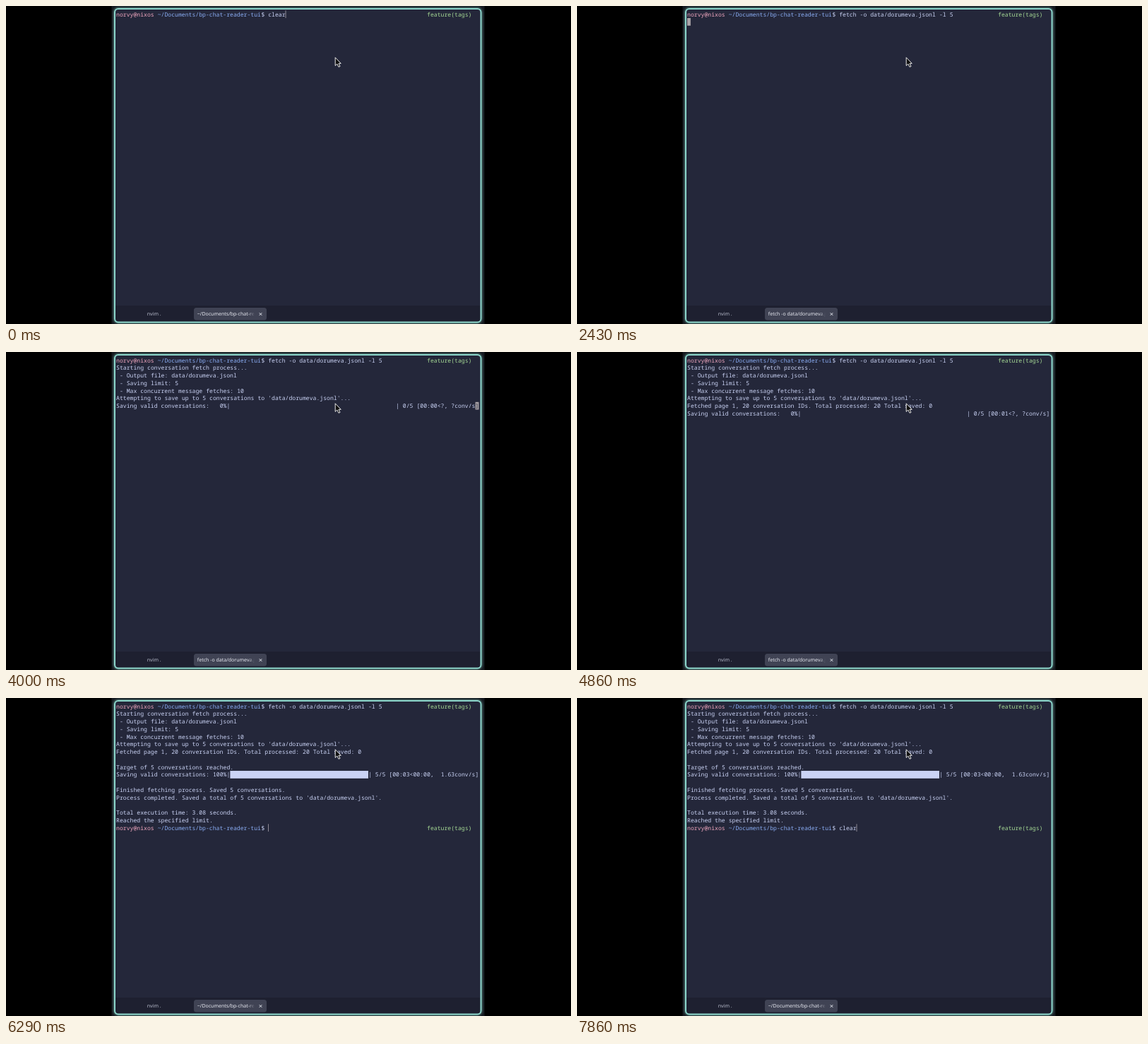
These frames come from a looping animation (800 px wide and 450 px high, 8 s). An HTML page:

```html
<!DOCTYPE html>
<html lang="en">
<head>
<meta charset="utf-8">
<title>Terminal fetch</title>
<style>
  html, body { margin: 0; width: 100%; height: 100%; overflow: hidden; background: #000; }
  svg { display: block; width: 800px; height: 450px; }
  text { white-space: pre; text-rendering: geometricPrecision; }
  #screen { font: 500 8.15px "Noto Sans Mono", "DejaVu Sans Mono", monospace; fill: #cad3f5; }
  .tab { font: 400 7px "Noto Sans", "Open Sans", sans-serif; }
</style>
</head>
<body>
<svg viewBox="0 0 800 450">
  <defs>
    <filter id="blur" x="-5%" y="-5%" width="110%" height="110%">
      <feGaussianBlur stdDeviation="1.5"/>
    </filter>
    <linearGradient id="fade" gradientUnits="userSpaceOnUse" x1="343" y1="0" x2="352" y2="0">
      <stop stop-color="#e6e8f0"/>
      <stop offset="1" stop-color="#e6e8f0" stop-opacity="0"/>
    </linearGradient>
    <clipPath id="frame"><rect x="154" y="4" width="518.5" height="443.5" rx="5"/></clipPath>
  </defs>
  <rect width="800" height="450"/>
  <rect x="149.5" y="0" width="528" height="450" fill="#15181e"/>
  <rect x="154" y="4" width="518.5" height="443.5" rx="5" fill="none" stroke="#8bd5ca" stroke-width="4" opacity=".5" filter="url(#blur)"/>
  <g clip-path="url(#frame)">
    <rect x="154" y="4" width="519" height="444" fill="#24273a"/>
    <rect x="154" y="424" width="519" height="24" fill="#1e2030"/>
  </g>
  <rect x="154" y="4" width="518.5" height="443.5" rx="5" fill="none" stroke="#8bd5ca" stroke-width="2"/>

  <text class="tab" x="199.8" y="438.3" fill="#b4b8c8">nvim .</text>
  <rect x="266" y="427" width="103" height="17.5" rx="3.5" fill="#404354"/>
  <text class="tab" id="title" x="270.8" y="438.3" fill="url(#fade)"></text>
  <path d="M358.7 434.2l3.6 3.6m0-3.6l-3.6 3.6" stroke="#e6e8f0" stroke-width="1"/>

  <g id="screen"></g>
  <path d="M466.2 72.8V84.4L468.9 82L471 86.3L473 85.4L471 81.3H474.3Z" fill="#111" stroke="#fff" stroke-width=".9" stroke-linejoin="round"/>
</svg>
<script>
const LOOP = 8000, COLS = 105, CELL = 4.89, ROW = 10.75, LEFT = 156, TOP = 6.3;
const NS = "http://www.w3.org/2000/svg";
const screenEl = document.getElementById("screen");
const titleEl = document.getElementById("title");

const FILE = "data/dorumeva.jsonl";
const COMMAND = `fetch -o ${FILE} -l 5`;
const FOLDER = "~/Documents/bp-chat-reader-tui";
const INTRO = [
  "Starting conversation fetch process...",
  ` - Output file: ${FILE}`,
  " - Saving limit: 5",
  " - Max concurrent message fetches: 10",
  `Attempting to save up to 5 conversations to '${FILE}'...`
];
const PAGE = "Fetched page 1, 20 conversation IDs. Total processed: 20 Total saved: 0";
const REACHED = ["", "Target of 5 conversations reached."];
const SUMMARY = [
  "",
  "Finished fetching process. Saved 5 conversations.",
  `Process completed. Saved a total of 5 conversations to '${FILE}'.`,
  "",
  "Total execution time: 3.08 seconds.",
  "Reached the specified limit."
];

const prompt = input => ({ input });
const progress = (done, stats) => ({ done, stats });
const start = [prompt(COMMAND), ...INTRO];
const saved = [...start, PAGE, ...REACHED];
const finished = [...saved, progress(5, "00:03<00:00,  1.63conv/s"), ...SUMMARY];

// [time, lines, command running]
const steps = [
  [0, [prompt("clear")]],
  [140, [prompt("")]],
  [1290, [prompt("clear")]],
  [1430, [prompt(COMMAND)]],
  [1860, [prompt(COMMAND), ""], true],
  [2860, [...start, progress(0, "00:00<?, ?conv/s")], true],
  [4430, [...start, PAGE, progress(0, "00:01<?, ?conv/s")], true],
  [5000, [...saved, progress(5, "00:02<00:00,  2.06s/conv")], true],
  [6140, [...finished, prompt("")]],
  [7710, [...finished, prompt(COMMAND)]],
  [7860, [...finished, prompt("clear")]]
];
// times when the block cursor shows while a command runs
const blockTimes = [[1860, 3140], [3740, 4340], [4940, 5540]];

function add(tag, attrs, parent = screenEl) {
  const el = document.createElementNS(NS, tag);
  for (const key in attrs) el.setAttribute(key, attrs[key]);
  return parent.appendChild(el);
}

const colX = col => LEFT + col * CELL;
const rowY = row => TOP + row * ROW;

function write(row, col, str, fill = "#cad3f5") {
  const text = add("text", { y: rowY(row) + 8.2, fill });
  for (const word of str.matchAll(/\S+\s*/g)) {
    add("tspan", { x: colX(col + word.index) }, text).textContent = word[0];
  }
  return col + str.length;
}

function cells(row, col, count, fill) {
  add("rect", { x: colX(col), y: rowY(row), width: count * CELL, height: ROW, fill });
}

// Each line returns the column where the cursor rests.
function drawLine(line, row) {
  if (typeof line === "string") return write(row, 0, line);
  if ("input" in line) {
    let col = write(row, 0, "norvy@nixos", "#f2a8c0");
    col = write(row, col + 1, FOLDER, "#8aadf4");
    col = write(row, col, "$ ");
    write(row, 90, "feature(tags)", "#a6da95");
    return write(row, col, line.input);
  }
  const percent = String(line.done * 20).padStart(3);
  const col = write(row, 0, `Saving valid conversations: ${percent}%|`);
  const tail = `| ${line.done}/5 [${line.stats}]`;
  const size = COLS - col - tail.length;
  if (line.done) cells(row, col, size * line.done / 5, "#cad3f5");
  write(row, col + size, tail);
  return COLS - 1;
}

function draw([, lines, running], block) {
  screenEl.replaceChildren();
  let col = 0;
  lines.forEach((line, row) => { col = drawLine(line, row); });
  const row = lines.length - 1;
  if (!running) {
    add("rect", { x: colX(col), y: rowY(row), width: .8, height: ROW, fill: "#a8a2ac" });
  } else if (block) {
    cells(row, col, 1, "#a8a2a6");
    if (col === COLS - 1) write(row, col, "]", "#24273a");
  }
  titleEl.textContent = running ? COMMAND.slice(0, 25) : FOLDER.slice(0, 22);
}

let shown = "";
const origin = performance.now();
function tick() {
  const t = (performance.now() - origin) % LOOP;
  const step = steps.findLast(s => s[0] <= t);
  const block = blockTimes.some(([on, off]) => t >= on && t < off);
  const key = step[0] + ":" + block;
  if (key !== shown) {
    draw(step, block);
    shown = key;
  }
  requestAnimationFrame(tick);
}
tick();
</script>
</body>
</html>
```
